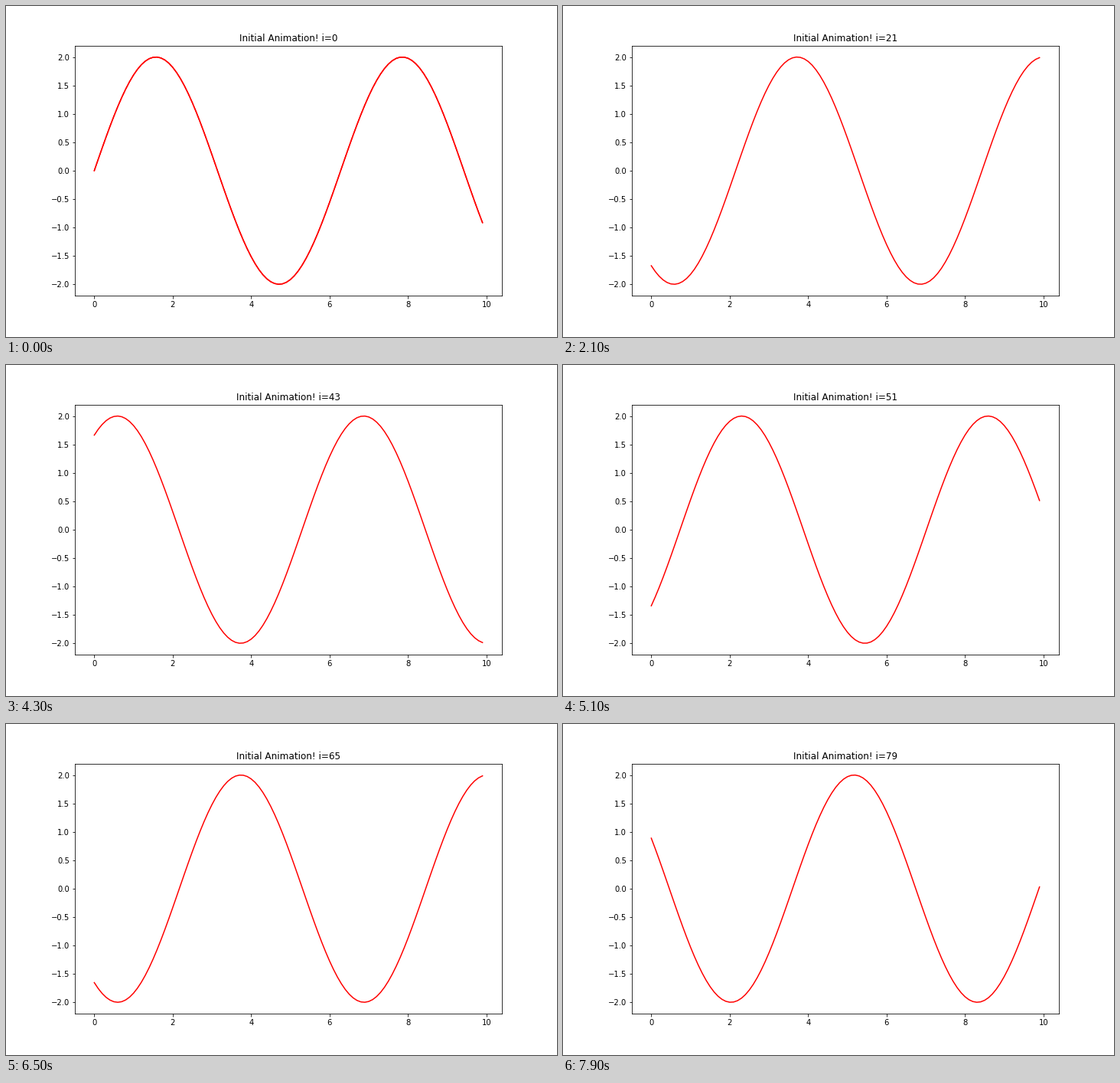
Animation of 720x432 px, one loop 8000 ms. Source, as a matplotlib script:

```python
import numpy as np
import matplotlib.pyplot as plt
from matplotlib.animation import FuncAnimation

FRAMES = 80
INTERVAL = 100  # ms

plt.rcParams.update({
    "font.family": "DejaVu Sans",
    "font.size": 10,
    "savefig.dpi": 72,
    "savefig.bbox": None,
})

fig, ax = plt.subplots(figsize=(10, 6), dpi=72)
fig.subplots_adjust(left=0.125, right=0.9, bottom=0.125, top=0.88)

x = np.arange(0, 10, 0.1)
line, = ax.plot(x, 2 * np.sin(x), "r", linewidth=1.5)
# The opening curve is stroked twice, which makes it look heavier.
overlay, = ax.plot(x, 2 * np.sin(x), "r", linewidth=1.5)
ax.set_xlim(ax.get_xlim())
ax.set_ylim(ax.get_ylim())
title = ax.set_title("Initial Animation! i=0", fontsize=12)


def update(i):
    line.set_ydata(2 * np.sin(x - i))
    overlay.set_visible(i == 0)
    title.set_text(f"Initial Animation! i={i}")
    return line, overlay, title


anim = FuncAnimation(fig, update, frames=FRAMES, interval=INTERVAL,
                     init_func=lambda: update(0), repeat=True,
                     repeat_delay=0, blit=False)

plt.show()
```
